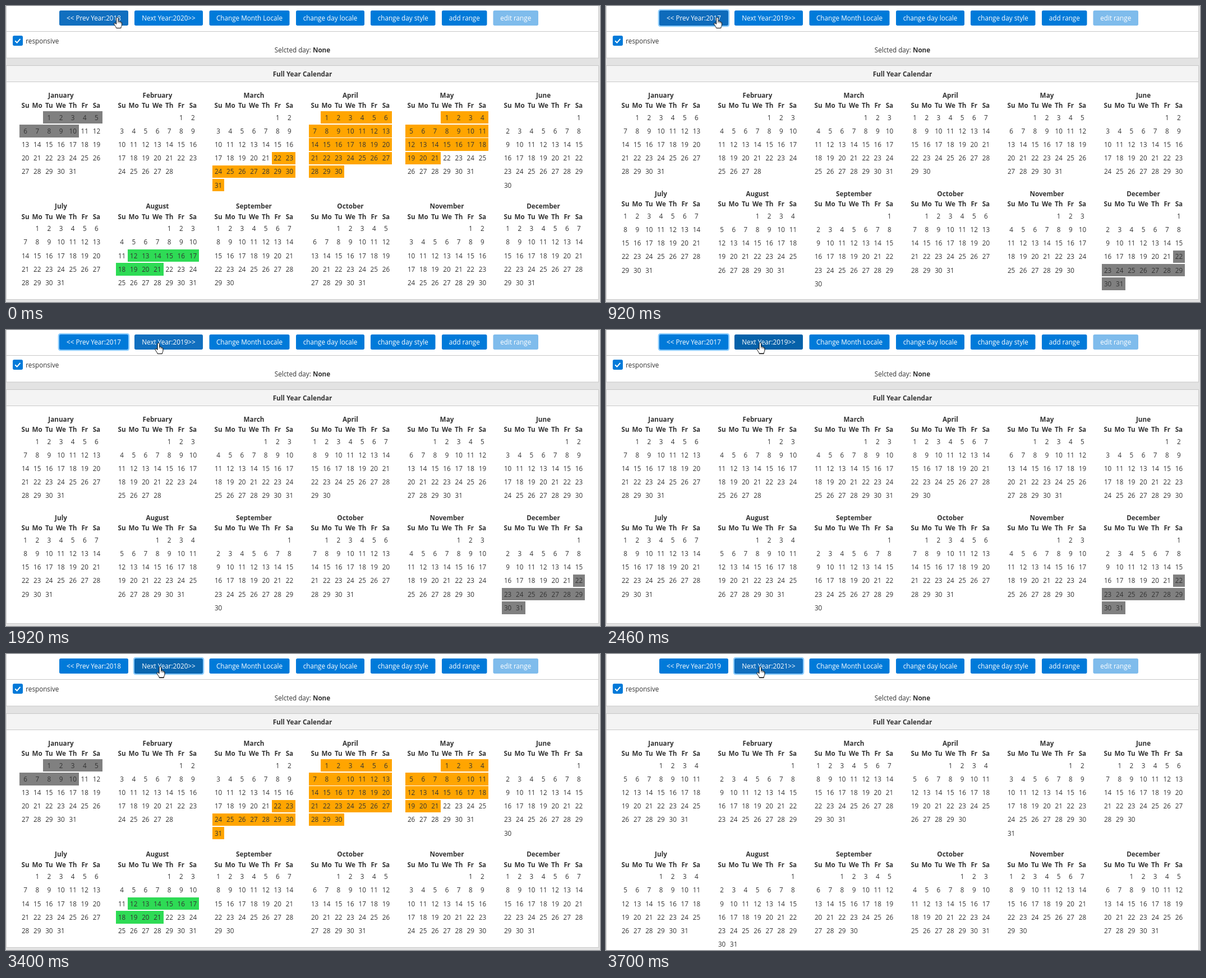
Write an HTML page that moves like this. It is 1059 px wide and 529 px high and loops after 4790 ms.

```html
<!DOCTYPE html>
<html lang="en">
<head>
<meta charset="utf-8">
<title>Full Year Calendar</title>
<style>
  html, body { margin: 0; width: 100%; height: 100%; overflow: hidden; background: #e3e3e3; }
  svg { display: block; width: 1059px; height: 529px; }
  text { font: 11.7px "Open Sans", sans-serif; fill: #333; text-anchor: middle; }
  .bold { font-weight: 700; }
  .start { text-anchor: start; }
  .label { fill: #fff; }
  .panel { fill: #fff; stroke: #c8c8c8; }
  .day { shape-rendering: crispEdges; }
</style>
</head>
<body>
<svg id="stage" viewBox="0 0 1059 529"></svg>
<script>
const LOOP = 4790;
const BASE = '#007ad9', HOVER = '#116fbf', ACTIVE = '#005b9f';
const MONTHS = ['January', 'February', 'March', 'April', 'May', 'June', 'July',
  'August', 'September', 'October', 'November', 'December'];
const WEEKDAYS = ['Su', 'Mo', 'Tu', 'We', 'Th', 'Fr', 'Sa'];
const CELL = 21.14, CELL_HEIGHT = 22.4, ROW = 24.2, MONTH = 172, LEFT = 24;

// Dates are written as yyyymmdd.
const RANGES = [
  { from: 20181222, to: 20190110, color: '#808080' },
  { from: 20190322, to: 20190521, color: '#ffa500' },
  { from: 20190812, to: 20190821, color: '#2edb55' }
];

const stage = document.getElementById('stage');

function add(parent, tag, attrs = {}, content) {
  const el = document.createElementNS('http://www.w3.org/2000/svg', tag);
  for (const key in attrs) el.setAttribute(key, attrs[key]);
  if (content !== undefined) el.textContent = content;
  return parent.appendChild(el);
}

const rect = (parent, x, y, width, height, attrs) =>
  add(parent, 'rect', { x, y, width, height, ...attrs });

// Baselines sit on whole pixels.
const text = (parent, x, y, content, cls = '') =>
  add(parent, 'text', { x, y: Math.round(y), class: cls }, content);

// Holds each value from its time (ms) until the next one.
function hold(el, prop, steps) {
  const frames = steps.map(([time, value]) =>
    ({ offset: time / LOOP, [prop]: value, easing: 'step-end' }));
  frames.push({ offset: 1, [prop]: steps[steps.length - 1][1] });
  el.animate(frames, { duration: LOOP, iterations: Infinity });
}

function drawTop() {
  rect(stage, 0.5, -5, 1056, 98, { class: 'panel' });
  add(stage, 'path', { d: 'M0 45.5H1057', stroke: '#c8c8c8' });
  rect(stage, 12, 53, 18, 18, { rx: 2.7, fill: BASE });
  add(stage, 'path', {
    d: 'M16.3 62.2l3.3 3.4 5.8-6.8', fill: 'none', stroke: '#fff', 'stroke-width': 2
  });
  text(stage, 35.3, 67, 'responsive', 'start');
  const selected = text(stage, 528.5, 83, 'Selcted day: ');
  add(selected, 'tspan', { class: 'bold' }, 'None');
}

function drawButton(x, width, label) {
  const g = add(stage, 'g');
  const ring = rect(g, x - 2.3, 5.7, width + 4.6, 31.6,
    { rx: 4.5, fill: '#8dcdff', opacity: 0 });
  const face = rect(g, x, 8, width, 27, { rx: 2.7, fill: BASE });
  if (label) text(g, x + width / 2, 26, label, 'label');
  return { g, ring, face };
}

function drawMonth(g, year, month, x, top) {
  text(g, x + CELL * 3.5, top + 163.7, MONTHS[month], 'bold');
  const center = col => x + 10.6 + CELL * col;
  WEEKDAYS.forEach((name, i) => text(g, center(i), top + 182.3, name, 'bold'));

  const first = new Date(year, month, 1).getDay();
  const days = new Date(year, month + 1, 0).getDate();
  for (let day = 1; day <= days; day++) {
    const slot = first + day - 1, col = slot % 7, row = Math.floor(slot / 7);
    const date = year * 10000 + (month + 1) * 100 + day;
    const range = RANGES.find(r => date >= r.from && date <= r.to);
    if (range) {
      rect(g, x + CELL * col, top + 188 + ROW * row, CELL, CELL_HEIGHT,
        { class: 'day', fill: range.color });
    }
    text(g, center(col), top + 203.6 + ROW * row, day);
  }
}

function rowsInHalf(year, start) {
  let most = 0;
  for (let m = start; m < start + 6; m++) {
    const slots = new Date(year, m, 1).getDay() + new Date(year, m + 1, 0).getDate();
    most = Math.max(most, Math.ceil(slots / 7));
  }
  return most;
}

function drawYear(year, steps) {
  const g = add(stage, 'g');
  const rows = [rowsInHalf(year, 0), rowsInHalf(year, 6)];
  const second = 198.5 + (rows[0] - 6) * CELL_HEIGHT;
  const bottom = 524.5 + (rows[0] + rows[1] - 11) * ROW;

  rect(g, 0.5, 106.5, 1056, bottom - 106.5, { class: 'panel' });
  rect(g, 0.5, 106.5, 1056, 29, { fill: '#f4f4f4', stroke: '#c8c8c8' });
  text(g, 528.5, 126, 'Full Year Calendar', 'bold');
  for (let m = 0; m < 12; m++) {
    drawMonth(g, year, m, LEFT + MONTH * (m % 6), m < 6 ? 0 : second);
  }
  text(g, 156.5, 26, `<< Prev Year:${year - 1}`, 'label');
  text(g, 290, 26, `Next Year:${year + 1}>>`, 'label');
  hold(g, 'visibility', steps);
}

function drawHand() {
  const g = add(stage, 'g');
  add(g, 'path', {
    d: 'M-1.9 2C-1.9-.3 1.7-.3 1.7 2V7.4C2.7 6.6 4.3 7 4.5 8.3C5.3 7.7 6.6 8 6.9 9.2' +
       'C7.7 9.2 8 10 8 11V14C8 16 6.3 17 6.3 19.5H-1.8C-1.8 17.5-5.6 14-6 11.8' +
       'C-6.2 10.2-4 9.8-1.9 12.4Z',
    fill: '#fff', stroke: '#000', 'stroke-linejoin': 'round'
  });
  add(g, 'path', { d: 'M1.7 7.4V10.4M4.5 8.3V10.8M6.9 9.2V11.2', stroke: '#000', 'stroke-width': 0.8 });
  const path = [
    [0, 198.5, 20], [1540, 208, 24], [1620, 214, 25.5], [1700, 233, 26],
    [1770, 252, 25.5], [1850, 265, 24], [1920, 272, 23], [2000, 275, 22.5]
  ];
  hold(g, 'transform', path.map(([t, x, y]) => [t, `translate(${x}px, ${y}px)`]));
}

drawTop();
const prev = drawButton(95, 123);
const next = drawButton(229, 122);
drawButton(362.5, 143, 'Change Month Locale');
drawButton(517, 122, 'change day locale');
drawButton(650, 115.5, 'change day style');
drawButton(777, 80.5, 'add range');
drawButton(868.5, 80.5, 'edit range').g.setAttribute('opacity', 0.5);

hold(prev.face, 'fill', [
  [0, HOVER], [670, '#0e6ab7'], [750, '#0966b0'], [830, '#0561a9'],
  [920, '#0e6bbb'], [990, HOVER], [1700, '#0d72c5'], [1770, '#0676cf'], [1850, BASE]
]);
hold(next.face, 'fill', [
  [0, BASE], [1700, '#0478d3'], [1770, '#0a74ca'], [1850, HOVER],
  [2400, '#0b69b4'], [2460, '#0561a9'], [2540, '#0e6bbb'], [2620, HOVER],
  [3400, '#0966b0'], [3460, ACTIVE], [3630, '#0b69b4'], [3700, HOVER]
]);
hold(prev.ring, 'opacity', [[0, 0], [920, 1], [2540, 0]]);
hold(next.ring, 'opacity', [[0, 0], [2540, 1]]);

drawYear(2019, [[0, 'visible'], [920, 'hidden'], [2540, 'visible'], [3630, 'hidden']]);
drawYear(2018, [[0, 'hidden'], [920, 'visible'], [2540, 'hidden']]);
drawYear(2020, [[0, 'hidden'], [3630, 'visible']]);
drawHand();
</script>
</body>
</html>
```
